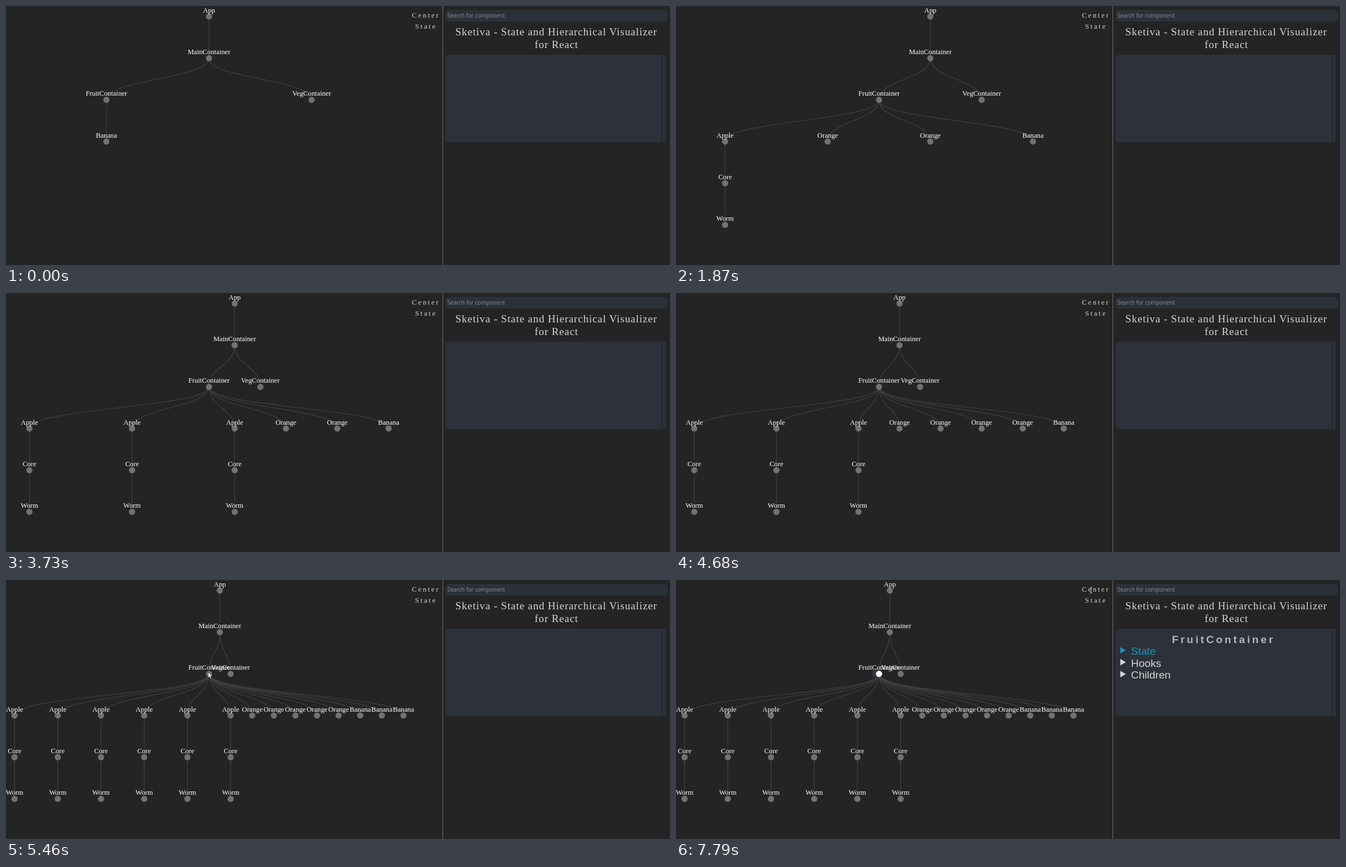
An HTML page for the animation above (8 s loop, 1197x468 px).

```html
<!DOCTYPE html>
<html lang="en">
<head>
<meta charset="utf-8">
<title>Component tree</title>
<style>
  html, body { margin: 0; width: 100%; height: 100%; overflow: hidden; background: #242424; }
  svg { display: block; }
  .serif { font-family: "Liberation Serif", "Times New Roman", serif; }
  .sans { font-family: "Liberation Sans", Arial, sans-serif; font-size: 19.2px; fill: #d6d6d6; }
  .label { font-size: 12.7px; fill: #fff; text-anchor: middle; }
  .menu { font-size: 12.7px; letter-spacing: 2.8px; fill: #d8d8d8; }
  .title { font-size: 19.2px; letter-spacing: .88px; fill: #d6d6d6; }
  .search { font: 10px "Open Sans", "Noto Sans", sans-serif; fill: #8d9197; }
  .head { font-weight: bold; letter-spacing: 3.84px; fill: #b0b6c8; }
  .link { fill: none; stroke: #414141; stroke-width: 1.2; }
</style>
</head>
<body>
<svg width="1197" height="468" viewBox="0 0 1197 468">
  <rect width="1197" height="468" fill="#242424"/>
  <g id="tree"></g>
  <rect x="787" width="1" height="468" fill="#707070"/>

  <g class="serif menu">
    <text x="731.7" y="21">Center</text>
    <text x="737.5" y="41">State</text>
  </g>

  <rect x="792" y="7" width="401" height="21" rx="7" fill="#2b3139"/>
  <text class="search" x="795.4" y="21.4">Search for component</text>
  <g class="serif title">
    <text x="810" y="53.3">Sketiva - State and Hierarchical Visualizer</text>
    <text x="953" y="75.6">for React</text>
  </g>

  <path d="M1189 88H799a7 7 0 0 0-7 7V239.5a7 7 0 0 0 7 7H1189Z" fill="#2d313a"/>
  <rect x="1182" y="88" width="1.2" height="158.5" fill="#1f2124"/>
  <g id="details" class="sans">
    <text class="head" x="894" y="113.6">FruitContainer</text>
  </g>

  <path id="arrow" d="M0 0V10.2L2.4 8 4 11.6 5.6 10.9 4.1 7.4H7.3Z"
        fill="#fff" stroke="#111" stroke-width=".6"/>
  <path id="beam" d="M-2.2-5H-.6L0-4.4 .6-5H2.2M0-4.4V4.4M-2.2 5H-.6L0 4.4 .6 5H2.2"
        fill="none" stroke="#d8d8d8" stroke-width="1"/>
</svg>
<script>
const LOOP = 8000, WIDTH = 740, SHIFT = -4, TOP = 19, STEP = 75.3;
const CLICK = 6230, SELECT = 6380;

// time, apples, oranges, bananas
const stages = [
  [0, 0, 0, 1], [150, 0, 1, 1], [630, 0, 2, 1], [1870, 1, 2, 1], [2480, 2, 2, 1],
  [3730, 3, 2, 1], [4050, 3, 3, 1], [4680, 3, 4, 1], [5140, 3, 5, 1], [5460, 6, 5, 3]
];
// time, pointer, x, y
const moves = [
  [0, ""], [5460, "arrow", 364.5, 166.6], [5630, "arrow", 363.5, 168.6],
  [7320, "beam", 741.5, 21.5], [7490, "beam", 743.5, 18.5],
  [7640, "beam", 746.5, 18.5], [7790, "beam", 748.2, 18.5]
];

const $ = id => document.getElementById(id);
const at = (list, t) => list.filter(e => e[0] <= t).pop();

// Tidy tree: leaves one unit apart, two where both neighbours have children.
function layout(apples, oranges, bananas) {
  const kinds = [
    ...Array(apples).fill("Apple"),
    ...Array(oranges).fill("Orange"),
    ...Array(bananas).fill("Banana")
  ];
  const slots = kinds.map((k, i) => i < apples ? 2 * i : i + Math.max(apples - 1, 0));
  const half = slots[slots.length - 1] / 2;
  const left = Math.min(-half, 0), right = Math.max(half, 1);
  const margin = half > 0 && half < 1 ? 1 : .5;
  const unit = WIDTH / (right - left + 2 * margin);

  const nodes = [];
  const add = (name, x, depth, parent) => {
    const node = {
      name, depth, parent,
      x: SHIFT + (x - left + margin) * unit,
      y: TOP + depth * STEP
    };
    nodes.push(node);
    return node;
  };
  const app = add("App", .5, 0);
  const main = add("MainContainer", .5, 1, app);
  const fruit = add("FruitContainer", 0, 2, main);
  add("VegContainer", 1, 2, main);
  kinds.forEach((kind, i) => {
    const x = slots[i] - half;
    const leaf = add(kind, x, 3, fruit);
    if (kind === "Apple") add("Worm", x, 5, add("Core", x, 4, leaf));
  });
  return nodes;
}

function link({ x, y, parent: p }) {
  const mid = (y + p.y) / 2;
  return `<path class="link" d="M${p.x} ${p.y}C${p.x} ${mid} ${x} ${mid} ${x} ${y}"/>`;
}

function drawTree(nodes, t) {
  const halo = t < CLICK ? "" :
    `<circle cx="363" cy="168.5" r="9.6" fill="${t < SELECT ? "#34475a" : "#2d3641"}"/>`;
  const dots = nodes.map(({ name, x, y }) => {
    const fill = name === "FruitContainer" && t >= SELECT ? "#fff" : "#727272";
    return `<circle cx="${x}" cy="${y}" r="5.6" fill="${fill}"/>` +
      `<text class="serif label" x="${x}" y="${y - 7.4}">${name}</text>`;
  });
  $("tree").innerHTML = halo + nodes.filter(n => n.parent).map(link).join("") + dots.join("");
}

["State", "Hooks", "Children"].forEach((name, i) => {
  const y = 135.1 + i * 21.5, fill = i ? "#d6d6d6" : "#2093b8";
  $("details").insertAdjacentHTML("beforeend",
    `<g fill="${fill}"><path d="M801 ${y - 13.8}v11.4l10-5.7Z"/>` +
    `<text x="820.3" y="${y}">${name}</text></g>`);
});

let shown = "";
function render(t) {
  const stage = at(stages, t);
  const key = [stage[0], t >= CLICK, t >= SELECT].join();
  if (key !== shown) {
    drawTree(layout(...stage.slice(1)), t);
    shown = key;
  }
  $("details").style.display = t >= SELECT ? "" : "none";
  const [, pointer, x, y] = at(moves, t);
  for (const id of ["arrow", "beam"]) {
    $(id).style.display = id === pointer ? "" : "none";
    if (id === pointer) $(id).setAttribute("transform", `translate(${x} ${y})`);
  }
}

const start = performance.now();
function frame(now) {
  render(Math.max(0, now - start) % LOOP);
  requestAnimationFrame(frame);
}
render(0);
requestAnimationFrame(frame);
</script>
</body>
</html>
```
